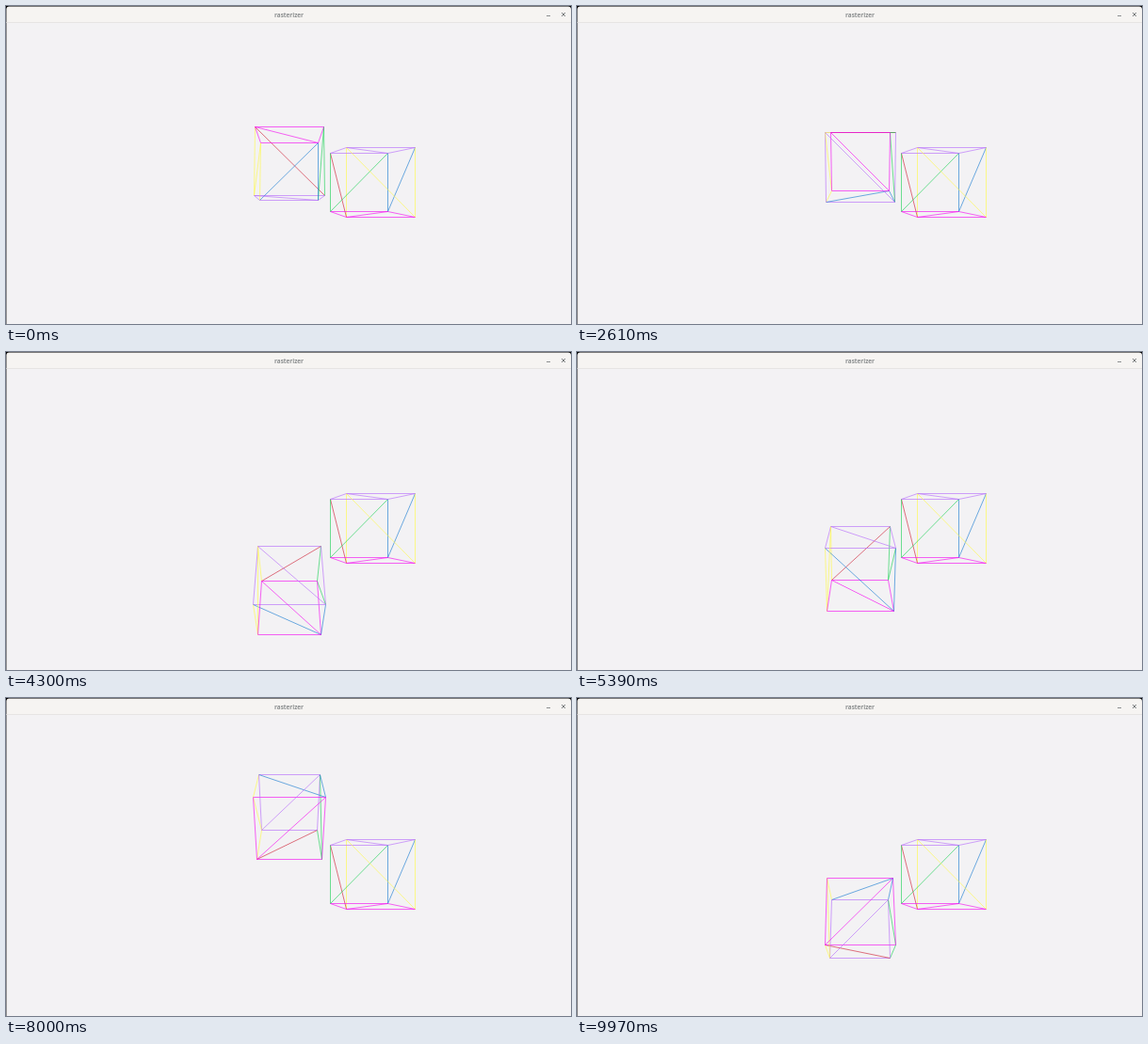
An HTML page with a canvas for the animation above (10 s loop, 600 by 338 pixels).

```html
<!DOCTYPE html>
<html lang="en">
<head>
<meta charset="utf-8">
<title>rasterizer</title>
<style>
  html, body { margin: 0; width: 100%; height: 100%; overflow: hidden; background: #f3f2f4; }
  canvas { display: block; }
</style>
</head>
<body>
<canvas id="stage" width="600" height="338"></canvas>
<script>
const ctx = document.getElementById('stage').getContext('2d');

const LOOP = 10000, FPS = 33, PHASE = 0.255;
const FOCAL_X = 379, FOCAL_Y = 383, DEPTH = 11.33;
const CENTER_X = 300.4, CENTER_Y = 187;

const VERTICES = [
  [1, 1, 1], [-1, 1, 1], [-1, -1, 1], [1, -1, 1],
  [1, 1, -1], [-1, 1, -1], [-1, -1, -1], [1, -1, -1]
];

// Two triangles per face; later faces own the shared edges.
const FACES = [
  ['#d0283c', '012', '023'],
  ['#22d25a', '403', '437'],
  ['#1f7fd2', '547', '576'],
  ['#fdf94e', '156', '162'],
  ['#b870fa', '451', '410'],
  ['#f410f2', '267', '273']
];

const edgeColors = new Map();
for (const [color, ...triangles] of FACES) {
  for (const [a, b, c] of triangles) {
    for (const pair of [[a, b], [b, c], [c, a]]) {
      edgeColors.set(pair.sort().join(''), color);
    }
  }
}

function project([x, up, away], vanishX) {
  const z = DEPTH + away;
  return [Math.round(vanishX + FOCAL_X * x / z), Math.round(CENTER_Y - FOCAL_Y * up / z)];
}

function drawCube(pose, vanishX) {
  const points = VERTICES.map(v => project(pose(v), vanishX));
  for (const [[a, b], color] of edgeColors) {
    ctx.strokeStyle = color;
    ctx.beginPath();
    ctx.moveTo(...points[a]);
    ctx.lineTo(...points[b]);
    ctx.stroke();
  }
}

function sidePose([x, y, z]) {
  return [3.855 - z, y, x];
}

function tumblingPose(time) {
  const angle = Math.PI + time / 2, c = Math.cos(angle), s = Math.sin(angle);
  const lift = 2 * Math.sin(time);
  return ([x, y, z]) => [x, y * c - z * s + lift, y * s + z * c];
}

function drawWindow() {
  ctx.fillStyle = '#000';
  ctx.fillRect(0, 0, 600, 338);
  ctx.fillStyle = '#f3f2f4';
  ctx.fillRect(0.4, 17, 599.6, 321);

  ctx.fillStyle = '#f6f4f2';
  ctx.beginPath();
  ctx.roundRect(0.4, 0.4, 599.6, 16.6, [3, 3, 0, 0]);
  ctx.fill();
  ctx.fillStyle = '#e6e4e3';
  ctx.fillRect(0.4, 17, 599.6, 1);

  ctx.fillStyle = '#8b8e8f';
  ctx.font = 'bold 6.4px "Open Sans", "Noto Sans", sans-serif';
  ctx.textAlign = 'center';
  ctx.fillText('rasterizer', 300.5, 11.7);

  ctx.fillRect(574, 10, 4, 1);
  ctx.strokeStyle = '#7c7f80';
  ctx.lineWidth = 1;
  ctx.beginPath();
  ctx.moveTo(590, 7);
  ctx.lineTo(594, 11);
  ctx.moveTo(594, 7);
  ctx.lineTo(590, 11);
  ctx.stroke();
}

function draw(now) {
  const ticks = Math.floor(now % LOOP / 10);
  const step = Math.ceil((ticks + 0.5) * FPS / 100) - 1;

  drawWindow();
  ctx.save();
  ctx.translate(0.5, 0.5);
  ctx.lineWidth = 0.65;
  drawCube(tumblingPose(step / FPS + PHASE), CENTER_X);
  drawCube(sidePose, 256);
  ctx.restore();
}

const start = performance.now();
function tick() {
  draw(performance.now() - start);
  requestAnimationFrame(tick);
}
tick();
</script>
</body>
</html>
```
